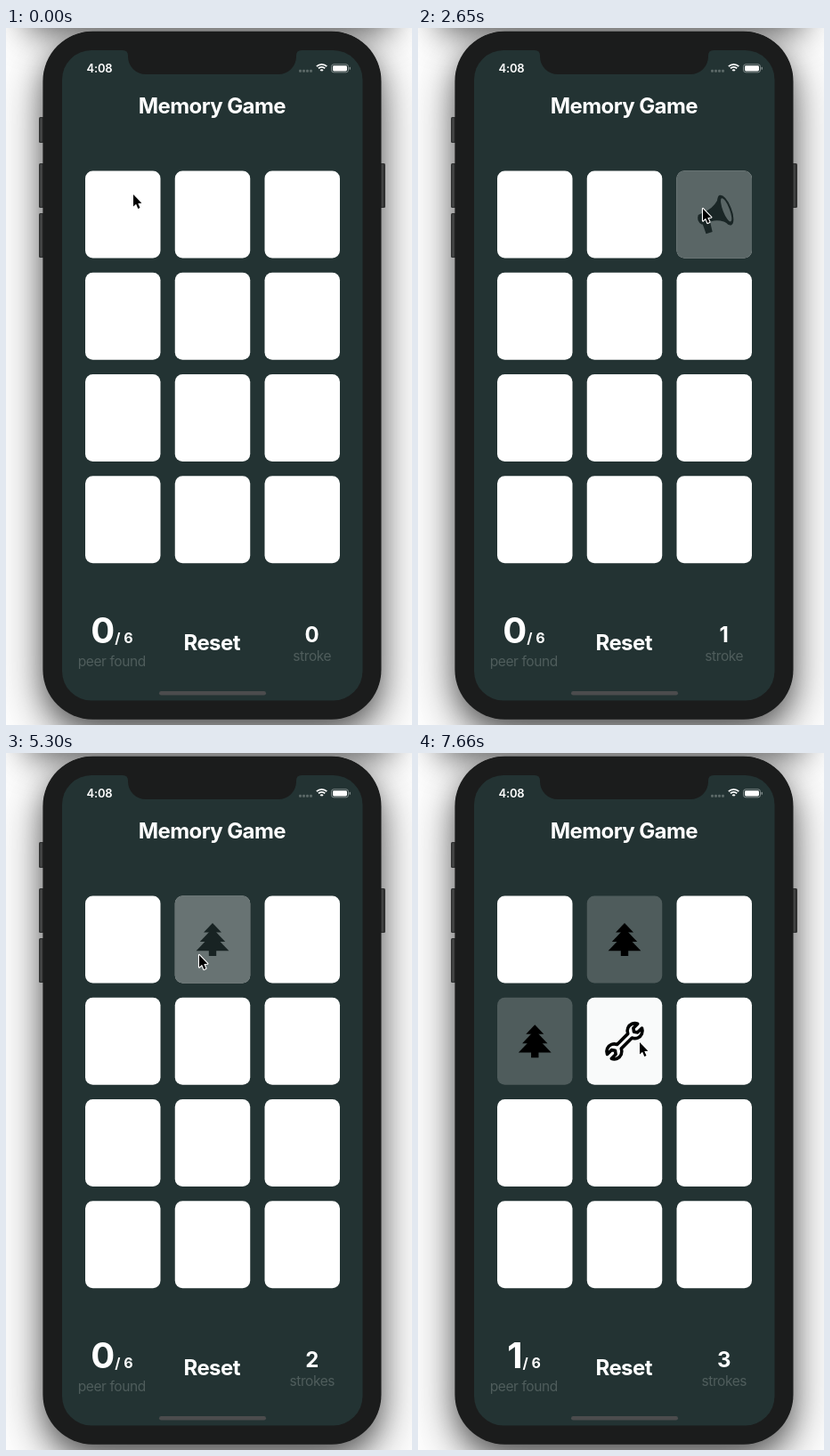
Animation, 456 px wide and 783 px high, one loop 8000 ms. Source, as an HTML page with a canvas:

```html
<!DOCTYPE html>
<html lang="en">
<head>
<meta charset="utf-8">
<title>Memory Game</title>
<style>
  html, body { margin: 0; width: 100%; height: 100%; overflow: hidden; background: #fff; }
  canvas { display: block; width: 456px; height: 783px; }
</style>
</head>
<body>
<canvas id="stage"></canvas>
<script>
const W = 456, H = 783, LOOP = 8000;
const TICK = 147.2;  // the picture advances in ticks of this many ms
const FADE = 1.7;    // length of the press fade, in ticks
const BG = '#233333', BEZEL = '#1b1c1c';
const canvas = document.getElementById('stage');
const dpr = window.devicePixelRatio || 1;
canvas.width = W * dpr;
canvas.height = H * dpr;
const ctx = canvas.getContext('2d');
ctx.scale(dpr, dpr);

// All times below are in ticks.
const taps = [
  { at: 2.7, card: 0, icon: wrench },
  { at: 7.7, card: 1, icon: tree },
  { at: 17.7, card: 2, icon: horn },
  { at: 26.85, card: 3, icon: tree },
  { at: 35.55, card: 1, icon: tree },
  { at: 40.4, card: 3, icon: tree },
  { at: 50.5, card: 4, icon: wrench }
];

const start = { x: 143, y: 187 };
const moves = [
  { from: 4, to: 8, x: 225, y: 202, lift: 0 },
  { from: 11.3, to: 15, x: 320, y: 203, lift: 6 },
  { from: 22, to: 27, x: 125, y: 322, lift: 0 },
  { from: 30, to: 34, x: 217, y: 227, lift: 0 },
  { from: 36, to: 39, x: 139, y: 317, lift: 0 },
  { from: 43, to: 47, x: 249, y: 325, lift: 20 }
];

const ease = x => x < 0.5 ? 2 * x * x : 1 - 2 * (1 - x) ** 2;
const progress = (t, from, to) => ease(Math.min(1, Math.max(0, (t - from) / (to - from))));

function box(x, y, w, h, r, color) {
  ctx.beginPath();
  ctx.roundRect(x, y, w, h, r);
  ctx.fillStyle = color;
  ctx.fill();
}

function oval(x, y, rx, ry, tilt, color) {
  ctx.beginPath();
  ctx.ellipse(x, y, rx, ry, tilt, 0, 2 * Math.PI);
  ctx.fillStyle = color;
  ctx.fill();
}

function shadowBox(x, y, w, h, r, blur, dy, alpha) {
  ctx.save();
  ctx.shadowColor = `rgba(0,0,0,${alpha})`;
  ctx.shadowBlur = blur * dpr;
  ctx.shadowOffsetY = dy * dpr;
  box(x, y, w, h, r, BEZEL);
  ctx.restore();
}

function setFont(weight, size, spacing) {
  ctx.font = `${weight} ${size}px Inter, Roboto, sans-serif`;
  ctx.letterSpacing = spacing + 'px';
}

function label(text, x, y, weight, size, { color = '#fff', align = 'center', spacing = 0 } = {}) {
  setFont(weight, size, spacing);
  ctx.textAlign = align;
  ctx.fillStyle = color;
  ctx.fillText(text, x, y);
}

function tree() {
  ctx.fillStyle = '#000';
  for (let i = 0; i < 3; i++) {
    const top = -18.5 + i * 6, base = -8 + i * 10.4, half = 10 + i * 4.2;
    ctx.beginPath();
    ctx.moveTo(0, top);
    ctx.lineTo(half, base);
    ctx.lineTo(-half, base);
    ctx.fill();
  }
  ctx.fillRect(-4.2, 12, 8.4, 6.5);
}

function wrench() {
  const R = 8.5, C = 16.4, shaft = 3.3, jaw = 3.4;
  const a = Math.asin(jaw / R), b = Math.PI - Math.asin(shaft / R);
  ctx.save();
  ctx.rotate(-Math.PI / 4);
  ctx.beginPath();
  for (const side of [0, 1]) {
    ctx.save();
    ctx.rotate(side * Math.PI);
    ctx.arc(C, 0, R, -b, -a);
    ctx.lineTo(C + 1, -jaw);
    ctx.lineTo(C - 1.5, 0);
    ctx.lineTo(C + 1, jaw);
    ctx.arc(C, 0, R, a, b);
    ctx.restore();
  }
  ctx.closePath();
  ctx.fillStyle = '#fff';
  ctx.fill();
  ctx.strokeStyle = '#000';
  ctx.lineWidth = 3.6;
  ctx.lineJoin = 'round';
  ctx.stroke();
  ctx.restore();
}

function horn() {
  const tilt = -0.37;
  ctx.save();
  ctx.rotate(tilt);
  ctx.fillStyle = '#000';
  ctx.beginPath();
  ctx.moveTo(13, -18);
  ctx.quadraticCurveTo(5, -8, -6, -7);
  ctx.lineTo(-17, -6);
  ctx.quadraticCurveTo(-22, 0, -17, 5.5);
  ctx.lineTo(-6, 6);
  ctx.quadraticCurveTo(5, 7, 13, 18);
  ctx.fill();
  ctx.beginPath();
  ctx.moveTo(-16, 4);
  ctx.lineTo(-16.5, 17);
  ctx.lineTo(-9, 17.5);
  ctx.lineTo(-7, 4);
  ctx.fill();
  oval(13.5, 0, 6.8, 18, 0, '#000');
  oval(14.4, 0, 3.7, 14, 0, '#fff');
  ctx.restore();
}

function drawBackdrop() {
  ctx.fillStyle = '#fff';
  ctx.fillRect(0, 0, W, H);
  shadowBox(24, -60, W - 48, 60, 0, 40, 2, 0.75);
  shadowBox(42, 4, 379, 772, 56, 54, 20, 0.55);
  shadowBox(42, 4, 379, 772, 56, 26, 12, 0.3);
}

function drawPhone() {
  for (const [x, y, h] of [[37, 100, 29], [37, 152, 50], [37, 208, 50], [420, 152, 50]]) {
    box(x, y, 6, h, 1.5, '#303131');
    box(x + 1.5, y + 1, 2, h - 2, 1, '#484949');
  }
  box(41.4, 3.7, 380.1, 773, 56, BEZEL);
  box(63, 25, 337.5, 730.5, 33, BG);

  // Notch
  ctx.beginPath();
  ctx.moveTo(131, 24);
  ctx.lineTo(131, 25);
  ctx.quadraticCurveTo(137, 25, 137, 31);
  ctx.arcTo(137, 52, 158, 52, 20);
  ctx.arcTo(326, 52, 326, 31, 20);
  ctx.lineTo(326, 31);
  ctx.quadraticCurveTo(326, 25, 332, 25);
  ctx.lineTo(332, 24);
  ctx.fillStyle = BEZEL;
  ctx.fill();
}

function drawStatus() {
  label('4:08', 90.5, 50, 600, 13, { align: 'left', spacing: -0.2 });
  for (let i = 0; i < 4; i++) box(329 + i * 4, 46.7, 3, 3, 1, '#5b6867');

  ctx.strokeStyle = '#fff';
  ctx.lineWidth = 1.9;
  for (const r of [8.4, 5.3, 2]) {
    ctx.beginPath();
    ctx.arc(354.6, 49.3, r, -2.32, -0.82);
    ctx.stroke();
  }

  ctx.beginPath();
  ctx.roundRect(365.5, 40.8, 19, 9, 2.6);
  ctx.strokeStyle = '#8b9595';
  ctx.lineWidth = 0.9;
  ctx.stroke();
  box(367, 42.2, 16, 6.2, 1.4, '#fff');
  box(385.6, 43.8, 1.3, 3, 0.7, '#8b9595');
}

// Plays the taps up to now: a third card turns an unequal pair back, an equal pair stays.
function play(t) {
  const game = { strokes: 0, matched: [], open: [] };
  for (const tap of taps.filter(p => p.at <= t)) {
    if (game.open.length === 2) game.open = [];
    game.open.push(tap);
    if (game.open.length < 2) continue;
    game.strokes++;
    if (game.open[0].icon === game.open[1].icon) {
      game.matched.push(...game.open);
      game.open = [];
    }
  }
  return game;
}

function drawCards(t, { open, matched }) {
  const w = 84.5, h = 98, r = 8.5;
  for (let i = 0; i < 12; i++) {
    const x = 89 + (i % 3) * 100.75, y = 160.5 + Math.floor(i / 3) * 114.25;
    const tap = [...open, ...matched].find(p => p.card === i);
    box(x, y, w, h, r, matched.includes(tap) ? '#4f5c5c' : '#fff');
    if (!tap) continue;
    ctx.save();
    ctx.translate(x + w / 2, y + h / 2);
    tap.icon();
    ctx.restore();
    ctx.globalAlpha = 0.8 * (1 - progress(t, tap.at, tap.at + FADE));
    box(x, y, w, h, r, BG);
    ctx.globalAlpha = 1;
  }
}

function drawScore({ strokes, matched }) {
  const found = String(matched.length / 2);
  const faint = { color: '#4f5d5c', spacing: -0.4 };

  setFont(700, 40, 0);
  const big = ctx.measureText(found).width;
  setFont(700, 16, 0);
  const left = 119 - (big + ctx.measureText('/ 6').width) / 2;
  label(found, left, 691, 700, 40, { align: 'left' });
  label('/ 6', left + big, 691, 700, 16, { align: 'left' });
  label('peer found', 118.8, 716.5, 400, 15.5, faint);

  label('Reset', 231.2, 699, 700, 24, { spacing: -0.6 });
  label(String(strokes), 343.7, 689.7, 700, 24);
  label(strokes > 1 ? 'strokes' : 'stroke', 343.8, 711, 400, 15.5, faint);
  box(172, 745, 120, 4.6, 2.3, '#4b4c4d');
}

function drawPointer(t) {
  let { x, y } = start;
  for (const m of moves) {
    const p = progress(t, m.from, m.to);
    x += (m.x - x) * p;
    y += (m.y - y) * p - m.lift * 4 * p * (1 - p);
  }
  ctx.save();
  ctx.translate(x, y);
  ctx.beginPath();
  ctx.lineTo(0, 0);
  ctx.lineTo(0, 13.6);
  ctx.lineTo(3.1, 10.8);
  ctx.lineTo(5.3, 16);
  ctx.lineTo(7.5, 15);
  ctx.lineTo(5.3, 10);
  ctx.lineTo(9.4, 9.7);
  ctx.closePath();
  ctx.lineJoin = 'round';
  ctx.lineWidth = 2.2;
  ctx.strokeStyle = '#fff';
  ctx.stroke();
  ctx.fillStyle = '#000';
  ctx.fill();
  ctx.restore();
}

function render() {
  const t = Math.floor((performance.now() % LOOP + 14) / TICK);
  const game = play(t);
  drawBackdrop();
  drawPhone();
  drawStatus();
  label('Memory Game', 231.4, 96, 700, 24, { spacing: -0.6 });
  drawCards(t, game);
  drawScore(game);
  drawPointer(t);
  requestAnimationFrame(render);
}
render();
</script>
</body>
</html>
```
